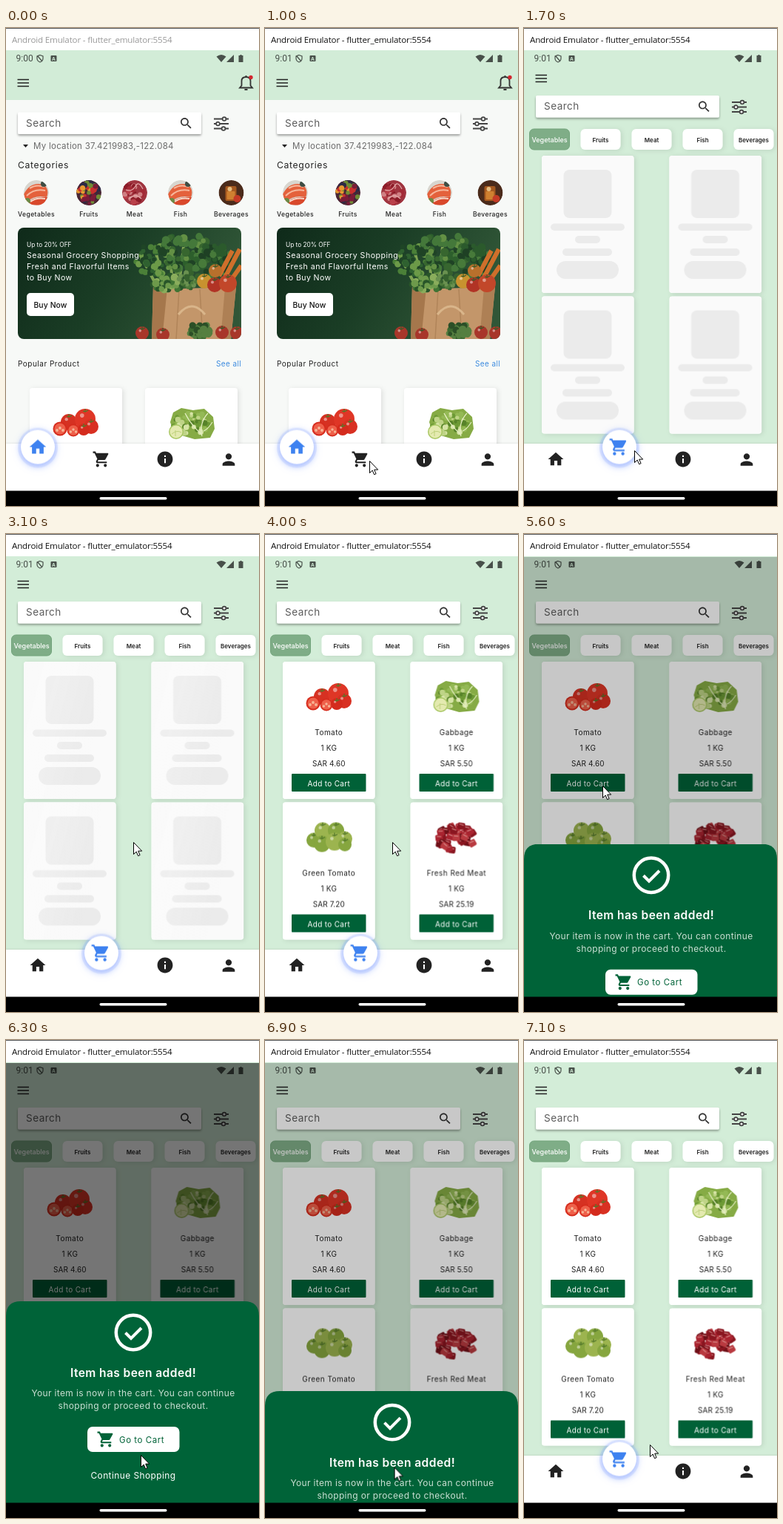
An HTML page for the animation above (7.2 s loop, 342 by 644 pixels).

```html
<!DOCTYPE html>
<html lang="en">
<head>
<meta charset="utf-8">
<title>Grocery app</title>
<style>
  html, body { margin: 0; width: 100%; height: 100%; overflow: hidden; background: #fff; }
  svg { display: block; }
  #stage { width: 342px; height: 644px; font-family: Inter, "Open Sans", sans-serif; }
  .loop, .loop * { animation-duration: 7200ms; animation-iteration-count: infinite; animation-timing-function: linear; }

  .before { animation-name: before; animation-timing-function: step-end; }
  .after { animation-name: after; animation-timing-function: step-end; }
  @keyframes before { 0% { visibility: visible } 1.389%, 100% { visibility: hidden } }
  @keyframes after { 0% { visibility: hidden } 1.389%, 100% { visibility: visible } }

  .home { animation-name: home; animation-timing-function: step-end; }
  .shop { animation-name: shop; animation-timing-function: step-end; }
  @keyframes home { 0% { visibility: visible } 18.056%, 100% { visibility: hidden } }
  @keyframes shop { 0% { visibility: hidden } 18.056%, 100% { visibility: visible } }

  .wait { animation-name: wait; animation-timing-function: step-end; }
  .ready { animation-name: ready; animation-timing-function: step-end; }
  .photo { animation-name: photo; animation-timing-function: step-end; }
  @keyframes wait { 0% { opacity: 1 } 44.444%, 100% { opacity: 0 } }
  @keyframes ready { 0% { opacity: 0 } 44.444%, 100% { opacity: 1 } }
  @keyframes photo { 0% { opacity: 0 } 45.833%, 100% { opacity: 1 } }

  .loop .shine { animation: shine 2400ms linear infinite; }
  @keyframes shine { 0% { transform: translateX(-125px) } 70%, 100% { transform: translateX(125px) } }

  .ball { animation-name: ball; filter: drop-shadow(0 2px 5px rgba(70,115,255,.5)); }
  @keyframes ball {
    0%, 15.972% { transform: translate(43px,564.5px); animation-timing-function: ease-in }
    18.056% { transform: translate(86px,582px); animation-timing-function: ease-out }
    20.833%, 100% { transform: translate(129px,564.5px) }
  }

  .dim { animation-name: dim; }
  @keyframes dim {
    0%, 76.389% { opacity: 0 } 79.861%, 93.75% { opacity: .54 } 97.222%, 100% { opacity: 0 }
  }
  .sheet { animation-name: sheet; }
  @keyframes sheet {
    0%, 76.389% { transform: translateY(273px); animation-timing-function: cubic-bezier(0,0,.2,1) }
    79.861%, 93.75% { transform: none; animation-timing-function: cubic-bezier(.4,0,1,1) }
    97.222%, 100% { transform: translateY(273px) }
  }

  .cursor { animation-name: cursor, show; animation-timing-function: ease-in-out, step-end; }
  @keyframes show { 0% { visibility: hidden } 6.944%, 100% { visibility: visible } }
  @keyframes cursor {
    0%, 6.944% { transform: translate(232px,622px) }
    12.5%, 18.056% { transform: translate(141px,583px) }
    22.222%, 25% { transform: translate(149px,569px) }
    36.111%, 61.111% { transform: translate(172px,415px) }
    70.833%, 79.167% { transform: translate(106px,339px) }
    87.5% { transform: translate(182px,559px) }
    91.667%, 94.444% { transform: translate(176px,585px) }
    98.611%, 100% { transform: translate(170px,545px) }
  }
</style>
</head>
<body>
<svg id="stage" class="loop" viewBox="0 0 342 644"></svg>
<script>
const icons = {
  home: 'M10 20v-6h4v6h5v-8h3L12 3 2 12h3v8z',
  cart: 'M7 18c-1.1 0-1.99.9-1.99 2S5.9 22 7 22s2-.9 2-2-.9-2-2-2zM1 2v2h2l3.6 7.59-1.35 2.45c-.16.28-.25.61-.25.96 0 1.1.9 2 2 2h12v-2H7.42c-.14 0-.25-.11-.25-.25l.03-.12.9-1.63h7.45c.75 0 1.41-.41 1.75-1.03l3.58-6.49c.08-.14.12-.31.12-.48 0-.55-.45-1-1-1H5.21l-.94-2H1zm16 16c-1.1 0-1.99.9-1.99 2s.89 2 1.99 2 2-.9 2-2-.9-2-2-2z',
  info: 'M12 2C6.48 2 2 6.48 2 12s4.48 10 10 10 10-4.48 10-10S17.52 2 12 2zm1 15h-2v-6h2zm0-8h-2V7h2z',
  person: 'M12 12c2.21 0 4-1.79 4-4s-1.79-4-4-4-4 1.79-4 4 1.79 4 4 4zm0 2c-2.67 0-8 1.34-8 4v2h16v-2c0-2.66-5.33-4-8-4z',
  search: 'M15.5 14h-.79l-.28-.27C15.41 12.59 16 11.11 16 9.5 16 5.91 13.09 3 9.5 3S3 5.91 3 9.5 5.91 16 9.5 16c1.61 0 3.09-.59 4.23-1.57l.27.28v.79l5 4.99L20.49 19zm-6 0C7.01 14 5 11.99 5 9.5S7.01 5 9.5 5 14 7.01 14 9.5 11.99 14 9.5 14z'
};

let seed = 11;
const rnd = (a, b) => {
  seed = (seed * 16807) % 2147483647;
  return +(a + (b - a) * seed / 2147483647).toFixed(1);
};
const repeat = (n, fn) => Array.from({ length: n }, (_, i) => fn(i)).join('');
const pick = list => list[Math.floor(rnd(0, list.length - .06))];

const rect = (x, y, w, h, fill, r = 0, more = '') =>
  `<rect x="${x}" y="${y}" width="${w}" height="${h}" rx="${r}" fill="${fill}" ${more}/>`;
const dot = (x, y, r, fill) => `<circle cx="${x}" cy="${y}" r="${r}" fill="${fill}"/>`;
const area = (d, fill) => `<path d="${d}" fill="${fill}"/>`;
const line = (d, color, w = 1) => `<path d="${d}" fill="none" stroke="${color}" stroke-width="${w}"/>`;
const group = (cls, body) => `<g class="${cls}">${body}</g>`;
const at = (x, y, body) => `<g transform="translate(${x} ${y})">${body}</g>`;
const text = (x, y, str, size, ls = 0, fill = '#222', weight = 400, mid = false, font = '') =>
  `<text x="${x}" y="${y}" font-size="${size}" letter-spacing="${ls}" fill="${fill}" font-weight="${weight}"` +
  `${mid ? ' text-anchor="middle"' : ''}${font && ` font-family="${font}"`}>${str}</text>`;
const icon = (name, x, y, fill = '#222', size = 25) =>
  `<path transform="translate(${x - size / 2} ${y - size / 2}) scale(${size / 24})" fill="${fill}" d="${icons[name]}"/>`;
const shadow = 'filter="url(#soft)"';

// Produce, drawn around its own centre
const scatter = (n, w, h, part) => repeat(n, () => {
  const a = rnd(0, 6.28), k = Math.sqrt(rnd(0, 1));
  return part((Math.cos(a) * w * k).toFixed(1), (Math.sin(a) * h * k).toFixed(1));
});
const leaves = (n, w, h, colors, size) =>
  scatter(n, w, h, (x, y) => dot(x, y, rnd(size / 2, size), pick(colors)));
const fruit = (x, y, r, color, stem) =>
  dot(x, y, r, color) + dot(x - r * .3, y - r * .35, r * .2, '#ffffff77') +
  line(`M${x - 3} ${y - r + 3}l3 1 4-2m-4 2v-4`, stem, 1.2);
const slice = (x, y, r) => dot(x, y, r, '#d62c1d') + dot(x, y, r * .8, '#ee604a') +
  repeat(3, i => dot(x + (i - 1) * r * .42, y + (i % 2 ? -1 : 2), r * .2, '#f7b596'));

const tomato = fruit(-9, 0, 11, '#d63122', '#4e7d2a') + fruit(13, -4, 14, '#df3626', '#4e7d2a') +
  fruit(21, 6, 10, '#d83022', '#4e7d2a') + slice(-21, 9, 9.5) + slice(-3, 11, 8.5) + fruit(11, 10, 8, '#d42b1d', '#4e7d2a');
const cabbage = area('M-25-15L-14-21 2-18 17-20 29-9 31 7 25 19 4 21-24 13-29-2z', '#86ab45') +
  leaves(60, 25, 15, ['#6d9a35', '#94b955', '#bfd487', '#d6e4a6', '#578329'], 4) +
  line('M14 17C10 5 16-8 22-14M13 14C4 6-4-4-9-14M16 10c6-2 9-8 12-12', '#e6efc4', 1.2) +
  dot(-21, 11, 10, '#a9c764') + dot(-21, 11, 8.5, '#e4eab0') + line('M-27 14q7-6 13-2m-8 5v-8', '#bdd07a');
const greens = [[-20, 4, 10], [-8, -9, 11], [10, -9, 11], [22, 2, 10], [-9, 9, 11], [8, 6, 12], [22, 10, 9]]
  .map(([x, y, r], i) => fruit(x, y, r, i % 2 ? '#9cb44f' : '#86a63f', '#50752a')).join('');
const meat = scatter(38, 26, 17, (x, y) =>
  `<g transform="translate(${x} ${y}) rotate(${rnd(-35, 35)})">` +
  rect(-5, -4, 10, 9, pick(['#8a1620', '#a92430', '#6f1018', '#b93a40']), 2) +
  line('M-3-2l6 1', '#dd9a96', 1) + '</g>');

// Round category pictures
const fish = area('M-17 2Q-8-16 10-11 18-4 14 6-2 2-14 13z', '#e4613c') +
  line('M-13 4q10-10 25-7M-9-6q9-6 20-2', '#f6b79c', 2) +
  area('M-12 16Q-6 4 15 6L9 17z', '#d9482b') + line('M-8 12q8-6 20-4', '#f9d8c8', 2) +
  dot(-12, 11, 4, '#6b8a45') + dot(10, -12, 4, '#3e4d43');
const pictures = [
  ['Vegetables', 41, '#d8d6cf', fish],
  ['Fruits', 112, '#4a2634', leaves(50, 15, 15, ['#c8302e', '#2d2a45', '#e89a30', '#6f8c35', '#7a1c38'], 4)],
  ['Meat', 174, '#a03540', leaves(36, 14, 14, ['#b9404a', '#8c1c28', '#d08084', '#a32a36'], 4) + line('M-12-4q9 3 13-5t10 4M-8 8q9-8 17 0', '#e3aaaa', 1.2)],
  ['Fish', 236, '#d8d6cf', fish],
  ['Beverages', 304.5, '#4b2b1b', rect(-8, -9, 15, 20, '#a5581f', 2) + rect(-6, -2, 11, 11, '#cf8030', 1) + dot(8, 8, 5, '#c43a26') + dot(-2, -5, 3, '#e6bd80')]
];
const categories = pictures.map(([name, x, fill, body]) =>
  at(x, 222, `<g clip-path="url(#round)">${dot(0, 0, 17, fill)}${body}</g>`) +
  text(x, 253.5, name, 8.6, .4, '#222', 500, true)).join('');

const stem = '#3b5b28';
const banner = `<g clip-path="url(#banner)">${rect(16, 269, 303, 151, 'url(#night)')}` +
  line('M205 350l-20-38M214 348l-12-48M225 345l-4-52M234 345l6-50', '#7fa352', 4) +
  at(200, 312, leaves(60, 26, 22, ['#2f6130', '#4b8038', '#1f4526', '#6c9a48'], 5)) +
  at(243, 302, leaves(90, 34, 27, ['#2d5f2c', '#44783a', '#1f4325', '#639044', '#37662f'], 6)) +
  at(282, 312, leaves(50, 22, 22, ['#2b5a2c', '#477a3a', '#1e4024'], 6)) +
  line('M296 336l20-38M288 334l18-34M304 340l14-20', '#cf6f2b', 6) +
  area('M199 346l40 5 72-2-7 71H197z', '#c3966a') + area('M199 346l19 4-7 70h-14z', '#a5774c') +
  area('M296 350l15-1-7 71h-14z', '#ae8055') + line('M234 352l-4 68M262 352l4 68', '#b08459', 1.5) +
  line('M233 386q18-22 36 0', '#d9b58a', 3) +
  at(218, 344, leaves(50, 22, 10, ['#3f7434', '#6d9a4b', '#285529', '#8aad5c'], 5)) +
  at(250, 340, leaves(36, 16, 11, ['#4d7a3a', '#36612e', '#6a9150'], 4)) +
  fruit(268, 341, 10, '#c8922f', stem) + fruit(282, 346, 10, '#b13325', stem) +
  fruit(300, 344, 12, '#c2472a', stem) + fruit(283, 327, 9, '#b8702c', stem) +
  at(262, 409, leaves(40, 15, 11, ['#3c6830', '#557f40', '#2b4f27'], 5)) +
  [[184, 411], [212, 413], [292, 410], [312, 411]].map(([x, y]) => fruit(x, y, 9, '#a8362a', stem)).join('') +
  '</g>' +
  text(28, 295, 'Up to 20% OFF', 8.3, 0, '#fff') +
  text(28, 310, 'Seasonal Grocery Shopping', 10.6, .5, '#fff') +
  text(28, 325, 'Fresh and Flavorful Items', 10.6, .5, '#fff') +
  text(28, 340, 'to Buy Now', 10.6, .4, '#fff') +
  rect(28, 357, 64, 31, '#fff', 5) + text(60, 377, 'Buy Now', 10.4, .1, '#111', 500, true);

const menu = y => line(`M15.500 ${y - 4.5}h15.500m-15.500 4.500h15.500m-15.500 4.500h15.500`, '#222', 1.7);
const searchBar = y => rect(16, y, 248, 29.5, '#fff', 2, 'filter="url(#drop)"') +
  text(27, y + 19, 'Search', 13.5, .5, '#5c5c5c') + icon('search', 243.5, y + 15, '#333', 20) +
  at(291, y + 15.5, line('M-10-6.500h20M-10 0h20M-10 6.500h20', '#444', 1.8) +
    [[4, -6.5], [-4.5, 0], [3, 6.5]].map(([x, d]) => `<circle cx="${x}" cy="${d}" r="2.4" fill="#f7faf7" stroke="#444" stroke-width="1.700"/>`).join(''));

const homePage = rect(0, 30, 342, 530, '#f7f9f7') + rect(0, 30, 342, 67, '#d2ecd7') + menu(74) +
  line('M316 80.500h17l-2.500-3v-6q0-5.500-6-5.500t-6 5.500v6zM324.500 66v-2M322.500 83h4', '#333', 1.8) + dot(331, 66.5, 2.7, '#d3262f') +
  searchBar(113.5) + area('M23 157h7l-3.500 4z', '#222') +
  text(37, 163, 'My location 37.4219983,-122.084', 11.5, .27, '#6b6b6b') +
  text(16, 188.5, 'Categories', 12.2, .65) + categories + banner +
  text(16, 456, 'Popular Product', 10, .5) + text(284, 456, 'See all', 10, .4, '#3d8bdf') +
  rect(32, 485, 125, 100, '#fff', 4, shadow) + rect(188, 485, 125, 100, '#fff', 4, shadow) +
  at(94, 531, tomato) + at(251, 533, cabbage);

const chips = pictures.map(([name], i) => {
  const x = 7.5 + i * 69, on = i === 0;
  return rect(x, 136, 54, 28, on ? '#7fad87' : '#fff', 6, on ? 'stroke="#72a37b"' : shadow) +
    text(x + 27, 153.5, name, on ? 9 : 8, 0, on ? '#fff' : '#222', on ? 500 : 600, true);
}).join('');

const items = [
  ['Tomato', '4.60', tomato, 24, 172], ['Gabbage', '5.50', cabbage, 196.5, 172],
  ['Green Tomato', '7.20', greens, 24, 361.5], ['Fresh Red Meat', '25.19', meat, 196.5, 361.5]
];
const bones = [[29.5, 19, 65, 8], [12, 91.5, 100, 5, 9.5], [45, 108, 34, 5, 10], [28, 125, 67, 5, 10], [20, 142, 84, 12, 24]];
const skeleton = '<svg width="124.5" height="185">' +
  rect(0, 0, 124.5, 185, '#fafafa', 4) +
  bones.map(([x, y, w, r, h = w]) => rect(x, y, w, h, '#ebebeb', r)).join('') +
  rect(0, 0, 124.5, 185, 'url(#glint)', 0, 'class="shine"') + '</svg>';
const product = (name, price, art) => rect(0, 0, 124.5, 185, '#fff', 4) +
  group('photo', at(62, 47, art)) +
  text(62.3, 98.5, name, 10, .45, '#222', 400, true) +
  text(62.3, 119.5, '1 KG', 10, .2, '#222', 400, true) +
  text(62.3, 140.5, 'SAR ' + price, 10, .1, '#222', 400, true) +
  rect(12, 151, 100.5, 24, '#006137', 1) + text(62.3, 167.5, 'Add to Cart', 10, .3, '#fff', 400, true);

const shopPage = rect(0, 30, 342, 530, '#d3edd8') + menu(68) + searchBar(91) + chips +
  items.map(([name, price, art, x, y]) => at(x, y, rect(0, 0, 124.5, 185, '#fff', 4, shadow) +
    group('wait', skeleton) + group('ready', product(name, price, art)))).join('');

const clock = str => text(13.5, 45, str, 12, 0, '#48504a', 400, false, 'Roboto, sans-serif');
const status = group('before', clock('9:00')) + group('after', clock('9:01')) +
  line('M46 36.500l4 1.500v3q0 3.500-4 5-4-1.500-4-5v-3zM43 38l6 7', '#48504a', 1.2) +
  rect(60.5, 37, 8, 8, '#48504a', 1) + text(64.5, 43.5, 'A', 6.5, 0, '#d2ecd7', 700, true) +
  area('M284.500 38.500q6.500-5 13 0L291 46zM308 36v10h-10zM314.500 37h2v-1h2v1h2v9h-6z', '#48504a');

const nav = rect(0, 560, 342, 64, '#fff', 0, 'filter="url(#edge)"') +
  group('shop', icon('home', 43, 581)) + group('home', icon('cart', 129, 581)) +
  icon('info', 215, 581) + icon('person', 301, 581.5) +
  group('ball', dot(0, 1, 27, '#5a82ff22') + dot(0, 0, 23, '#fff') +
    group('home', icon('home', 0, 0, '#3e82f0', 27)) + group('shop', icon('cart', -1, 0, '#3e82f0', 27)));

const sheet = area('M0 630V372q0-20 20-20h302q20 0 20 20v258z', '#006338') +
  '<circle cx="172" cy="394" r="23.2" fill="none" stroke="#fff" stroke-width="4.500"/>' +
  line('M161.500 394.500l7.500 7.500 14-14', '#fff', 4) +
  text(172, 453.5, 'Item has been added!', 15.6, .4, '#fff', 600, true) +
  text(172, 480, 'Your item is now in the cart. You can continue', 12, .35, '#c9dfd3', 400, true) +
  text(172, 497, 'shopping or proceed to checkout.', 12, .35, '#c9dfd3', 400, true) +
  rect(110, 521, 124.5, 34, '#fff', 7) + icon('cart', 135, 538, '#006338', 25) +
  text(153, 542.5, 'Go to Cart', 11.5, .55, '#006338') +
  text(172, 591, 'Continue Shopping', 11.9, .45, '#fff', 400, true);

const title = fill => text(8, 20, 'Android Emulator - flutter_emulator:5554', 11.6, -.17, fill, 400, false, 'Open Sans, sans-serif');

document.getElementById('stage').innerHTML = `<defs>
  <clipPath id="round"><circle r="17"/></clipPath>
  <clipPath id="banner"><rect x="16" y="269" width="302" height="150" rx="8"/></clipPath>
  <clipPath id="screen"><rect y="30" width="342" height="594"/></clipPath>
  <linearGradient id="night" y2=".3"><stop stop-color="#0f2a1a"/><stop offset=".5" stop-color="#1a3d25"/><stop offset="1" stop-color="#305637"/></linearGradient>
  <linearGradient id="glint" y2=".4"><stop stop-color="#fff" stop-opacity="0"/><stop offset=".5" stop-color="#fff" stop-opacity=".25"/><stop offset="1" stop-color="#fff" stop-opacity="0"/></linearGradient>
  <filter id="soft" x="-20%" y="-30%" width="140%" height="170%"><feDropShadow dy="1" stdDeviation="3" flood-opacity=".1"/></filter>
  <filter id="drop" x="-5%" y="-30%" width="110%" height="180%"><feDropShadow dx="0" dy="2" stdDeviation="1.500" flood-opacity=".36"/></filter>
  <filter id="edge" x="-5%" y="-20%" width="110%" height="140%"><feDropShadow dx="0" dy="-1" stdDeviation="1" flood-opacity=".07"/></filter>
</defs>` +
  rect(0, 0, 342, 644, '#fff') +
  `<g clip-path="url(#screen)">${group('home', homePage)}${group('shop', shopPage)}${status}${nav}` +
  rect(0, 31, 342, 593, '#000', 0, 'class="dim"') + group('sheet', sheet) + '</g>' +
  rect(0, 0, 342, 1, '#55585a') + group('before', title('#999')) + group('after', title('#111')) +
  rect(0, 623.5, 342, 21, '#000') + rect(126.5, 632, 91, 3.5, '#fff', 1.7) +
  '<path class="cursor" d="M.500.500v16l3.700-3.500 2.400 5.700 2.500-1.100-2.400-5.500h5z" fill="#fff" stroke="#000"/>';
</script>
</body>
</html>
```
